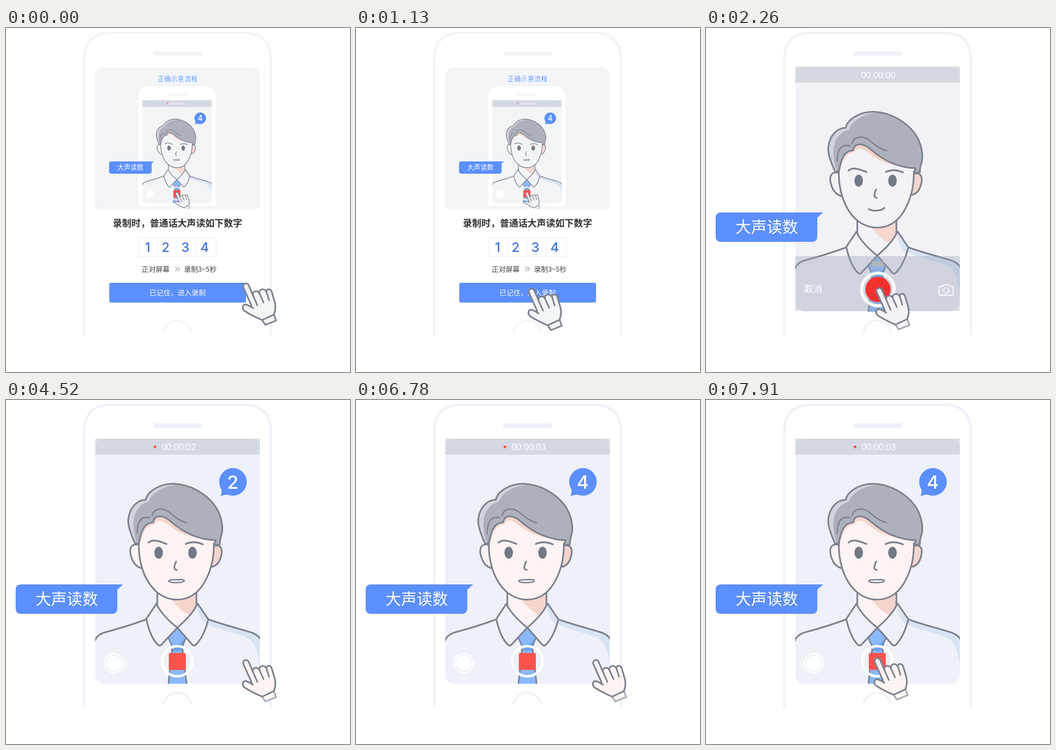
Recreate the animation shown at these times as an HTML page with a canvas. Size 748 by 748 pixels, loop 8 s.

```html
<!DOCTYPE html>
<html lang="zh-CN">
<head>
<meta charset="utf-8">
<title>录制示意</title>
<style>
  html, body { margin: 0; width: 100%; height: 100%; overflow: hidden; background: #fff; }
  canvas { display: block; width: 748px; height: 748px; }
</style>
</head>
<body>
<canvas id="stage" width="748" height="748"></canvas>
<script>
const ctx = document.getElementById('stage').getContext('2d');
const CJK = '"Noto Sans CJK SC", "Noto Sans CJK", sans-serif';
const LATIN = 'Inter, Roboto, sans-serif';
const CLOCK = '"Liberation Sans", Roboto, sans-serif';
const BLUE = '#5c8fff', LINE = '#7c818e', LOOP = 8000, STEP = 1130;

const GUIDE = { bg: '#f2f4f6', skin: '#f2f4f6', blush: '#f8d8d1', phone: '#f3f4f6', cuff: LINE };
const READY = { bg: '#f1f1f6', skin: '#f2f2f7', blush: '#f6d6ce', phone: '#f1f1f7', cuff: '#a2a5b0' };
const LIVE = { bg: '#eef1f8', skin: '#fdf3f2', blush: '#f4d5ce', phone: '#eef1f8', cuff: '#a6a9b4' };

function shape(d, fill, stroke, width = 3.6) {
  const path = new Path2D(d);
  if (fill) { ctx.fillStyle = fill; ctx.fill(path); }
  if (stroke) { ctx.strokeStyle = stroke; ctx.lineWidth = width; ctx.stroke(path); }
}

function box(x, y, w, h, r, fill) {
  ctx.beginPath();
  ctx.roundRect(x, y, w, h, r);
  ctx.fillStyle = fill;
  ctx.fill();
}

function disc(x, y, r, fill) {
  ctx.beginPath();
  ctx.arc(x, y, r, 0, Math.PI * 2);
  ctx.fillStyle = fill;
  ctx.fill();
}

function ring(x, y, r, width, color, from = 0, to = Math.PI * 2) {
  ctx.beginPath();
  ctx.arc(x, y, r, from, to);
  ctx.strokeStyle = color;
  ctx.lineWidth = width;
  ctx.stroke();
}

// y is the visual middle of the line
function label(s, x, y, size, color, { font = CJK, weight = 400, align = 'center', halo } = {}) {
  ctx.font = `${weight} ${size}px ${font}`;
  ctx.textAlign = align;
  const base = y + size * 0.365;
  if (halo) {
    ctx.strokeStyle = halo;
    ctx.lineWidth = 4;
    ctx.strokeText(s, x, base);
  }
  ctx.fillStyle = color;
  ctx.fillText(s, x, base);
}

function clipped(x, y, w, h, r, draw) {
  ctx.save();
  ctx.beginPath();
  ctx.roundRect(x, y, w, h, r);
  ctx.clip();
  draw();
  ctx.restore();
}

function phone(c) {
  shape('M170 666 V70 Q170 11 228 10.5 H518 Q576 11 576 70 V666', '#fff', c.phone, 5);
  box(320, 50.5, 106, 10.5, 4, c.phone);
  ring(372.5, 667, 30.5, 3.5, c.phone, Math.PI * 1.06, Math.PI * 1.94);
}

function hand(dx, dy, fill, cuff) {
  ctx.save();
  ctx.translate(dx, dy);
  shape('M556 644 L564 655.5 L587.5 646 L582 632 Z', fill, cuff, 3.4);
  shape('M534 614 L516 574 C513.5 566 524 562 527.5 569 L537 591 C535 582 546 579 551 587 ' +
    'C549 577 562 575 566.5 584 C565 577 575 575 578 584 L585 608 Q587.5 620 582.5 633 ' +
    'L557 645 C545 640 531 633 520 626 C511 620 515 609 523 611.5 Q530 614 537 619', fill, LINE, 3.5);
  shape('M537 591 L546.5 613 M551 587 L560 607 M566.5 584 L572 602', null, LINE, 3.3);
  ctx.restore();
}

function shirt(c) {
  const flap = 'M417 443 L440 477 C434 500 425 520 413 532 Q409 536 405 532 L372.5 495 C391 479 406 464 414 447 Z';
  shape('M440 477 C470 488 510 498 535 506 Q548 511 552 520 V576 C546 545 545 522 512 512 C486 504 460 498 437 487 Z', '#d8e3f3');
  shape('M329 416 V444 Q344 474 372.5 495 Q402 474 414 444 V418 Z', c.skin);
  shape('M359 433 C382 435 400 428 414 418 V446 Q409 459 398 468 Q376 456 359 433 Z', c.blush);
  shape('M329 416 V447 M414 420 V447', null, LINE);
  shape('M305 477 C270 490 235 500 216 505 Q198 510 193 524', null, LINE);
  shape('M440 477 C470 488 510 498 535 506 Q548 511 553 520', null, LINE);
  shape('M361 543 H384 L393 619 H353 Z', '#8bb9ff', LINE, 3.2);
  shape('M372 495 L352 515 L361 535 Q372 548 384 535 L392 515 Z', '#8bb9ff');
  shape('M390 517 Q382 531 364 535 V544 Q374 549 384 542 L392 515 Z', '#6da2f5');
  shape('M352 515 L361 535 V548 M392 515 L384 535 V548', null, LINE, 3);
  shape('M327 443 L305 476 C310 499 318 520 330 532 Q334 536 338 532 L372.5 495 C352 479 338 464 329 447 Z', c.bg, LINE);
  shape(flap, c.bg);
  shape('M417 443 L440 477 L436 490 Q421 478 415 450 Z', '#d8e3f3');
  shape(flap, null, LINE);
}

function head(c, talking) {
  shape('M289 315 C271 311 267 324 272 340 Q278 362 296 366', c.skin, LINE);
  shape('M452 317 C466 313 472 323 468 338 Q463 361 446 363', c.blush, LINE);
  shape('M289 298 C286 345 298 389 325 415 Q346 434 372 434 C400 434 421 418 435 390 C449 362 452 335 452 300 L400 260 H310 Z', c.skin);
  shape('M291 312 C294 284 303 270 321 267 C323 249 343 250 356 262 C378 283 399 295 425 300 ' +
    'C395 298 371 287 351 270 Q330 255 323 270 C304 274 298 287 294 304 Z', c.blush);
  shape('M289 306 C287 347 298 389 325 415 Q346 434 372 434 C400 434 421 418 435 390 C449 362 452 338 452 312', null, LINE);

  const lower = 'L452 315 L456 305 C422 304 390 292 358 264 C343 250 323 248 320 266 C301 267 294 283 289 311 L281 313';
  const crown = 'C400 183 434 203 453 228 C468 248 473 275 469 292 Q465 302 465 314 ';
  const outer = 'M281 313 C271 291 264 270 266 258 C269 235 284 217 304 217 C307 199 334 182 364 182 ' + crown + lower + ' Z';
  shape(outer, '#d0d4de');
  shape('M285 312 C278 295 273 267 281 247 Q291 225 311 221 C315 205 339 187 372 184 ' + crown + lower + ' Z', '#adb1bc');
  shape(outer, null, LINE);
  shape('M285 290 C286 267 291 251 313 256 M318 251 C321 235 341 233 355 244 C369 256 378 263 393 267', null, LINE, 2.8);

  shape('M310 310 C319 302 331 306 349 313 M391 313 C402 308 415 308 428 314', null, LINE, 3.8);
  for (const x of [332, 405.5]) {
    ctx.beginPath();
    ctx.ellipse(x, 332, 9.3, 13, 0, 0, Math.PI * 2);
    ctx.fillStyle = '#727987';
    ctx.fill();
  }
  shape('M370 351 C365 362 364 369 371.5 369.5', null, LINE);
  if (talking) {
    shape('M354 394 Q355 391 361 391 L381 390.5 Q387.5 390.5 387.5 393 Q386 397 371 397 Q355 397 354 394 Z', '#fff', LINE, 3);
  } else {
    shape('M354 394 C362 399 382 398 388 391', null, LINE);
  }
}

function timeBar(seconds, live) {
  ctx.fillStyle = '#dbdee4';
  ctx.fillRect(194.5, 84, 357.5, 34.5);
  box(194.5, 84, 357.5, 34.5, [20, 20, 0, 0], '#d4d8e0');
  if (live) disc(324, 102, 3, '#fa534d');
  label('00:00:0' + seconds, live ? 375.5 : 374.5, 102, 19.3, '#fff', { font: CLOCK });
}

function speech(halo) {
  const d = 'M33 401 H254.5 L242 412.5 V453 Q242 465 230 465 H33 Q21 465 21 453 V413 Q21 401 33 401 Z';
  if (halo) shape(d, null, '#fff', 9);
  shape(d, BLUE);
  label('大声读数', 132, 432.5, 34, '#fff');
}

function badge(n) {
  disc(493.5, 178, 30, BLUE);
  shape('M467 190 Q471 200 466 209.5 Q475 205 486 206 Z', BLUE);
  label(n, 493, 178, 40, '#fff', { font: LATIN, weight: 500 });
}

function liveScene(c, n, seconds, halo) {
  phone(c);
  clipped(194, 84, 358, 533, [0, 0, 20, 20], () => {
    ctx.fillStyle = c.bg;
    ctx.fillRect(194, 84, 358, 533);
    shirt(c);
    head(c, true);
  });
  timeBar(seconds, true);
  badge(n);
  ring(234.5, 572.5, 20.8, 3, '#fff');
  disc(234.5, 572.5, 16.5, '#fff');
  ring(372.5, 568, 32.8, 5.5, '#fff');
  box(354, 550, 37, 37, 4, '#fc534d');
  speech(halo);
}

function cameraIcon() {
  shape('M509 562 H514 L517 558.5 H528 L531 562 H535 Q537.5 562 537.5 565 V578 Q537.5 581 534.5 581 H509.5 Q506.5 581 506.5 578 V565 Q506.5 562 509 562 Z', null, '#fff', 2);
  ring(522, 571, 6, 1.7, '#fff', Math.PI * 1.1, Math.PI * 1.8);
  ring(522, 571, 6, 1.7, '#fff', Math.PI * 0.1, Math.PI * 0.8);
  shape('M525 570 H531 L528 573.5 Z M513 571.5 H519 L516 568 Z', '#fff');
}

function readyScene() {
  const c = READY;
  phone(c);
  ctx.fillStyle = c.bg;
  ctx.fillRect(194, 84, 358, 531);
  clipped(194, 84, 358, 533, [0, 0, 20, 20], () => {
    shirt(c);
    head(c, false);
  });
  ctx.fillStyle = '#dcdfe5';
  ctx.fillRect(194.5, 594, 20, 21);
  ctx.fillRect(532, 594, 20, 21);
  clipped(194.5, 496, 357.5, 120, [0, 0, 20, 20], () => {
    ctx.fillStyle = c.bg;
    ctx.fillRect(194, 590, 24, 28);
    ctx.fillRect(528, 590, 24, 28);
    ctx.fillStyle = 'rgba(147,158,180,.35)';
    ctx.fillRect(194, 496, 358, 120);
  });
  timeBar(0, false);
  label('视频', 373, 513, 14, '#d8c27a');
  label('取消', 233, 568, 20, '#fff');
  cameraIcon();
  ring(374, 568.5, 35.5, 6.5, '#fff');
  disc(374, 568.5, 27.5, '#f53130');
  speech();
  hand(-145, 0, c.skin, c.cuff);
}

function guideScene(dx, dy) {
  phone(GUIDE);
  box(194, 86, 357.5, 307, [18, 18, 0, 0], GUIDE.bg);
  label('正确示意流程', 373, 111, 14.5, BLUE, { halo: '#fff' });

  // the recording screen, shrunk into the card
  const k = 0.42;
  clipped(194, 86, 357.5, 307, 0, () => {
    ctx.translate(215.1, 121.6);
    ctx.scale(k, k);
    clipped(0, 0, 748, 632, 0, () => liveScene(GUIDE, 4, 3, true));
    hand(-149, -4, GUIDE.skin, '#a6a9b4');
  });

  label('录制时，普通话大声读如下数字', 373, 425, 20.1, '#333', { weight: 600 });
  ctx.strokeStyle = '#eceef2';
  ctx.lineWidth = 1.3;
  ctx.strokeRect(289, 456, 168, 41);
  for (const x of [330, 371.5, 414]) shape(`M${x} 456 V497`, null, '#eceef2', 1.3);
  [308, 347, 390, 432].forEach((x, i) =>
    label(i + 1, x, 477, 28.5, '#4272dd', { font: LATIN, weight: 500 }));
  label('正对屏幕', 295, 524, 15.2, '#444', { align: 'left' });
  shape('M368.5 519.5 L372 524 L368.5 528.5 M373.5 519.5 L377 524 L373.5 528.5', null, '#777', 1.2);
  label('录制3~5秒', 387, 524, 15.2, '#444', { align: 'left' });
  box(224.5, 554, 297.5, 43, 4, BLUE);
  label('已记住，进入录制', 373, 575.5, 15.3, '#fff');
  hand(dx, dy, GUIDE.skin, GUIDE.cuff);
}

function draw(t) {
  ctx.fillStyle = '#fff';
  ctx.fillRect(0, 0, 748, 748);
  ctx.lineCap = ctx.lineJoin = 'round';
  const step = Math.floor(t / STEP);
  if (step === 0) return guideScene(0, -10);
  if (step === 1) return guideScene(-140, 1.5);
  if (step === 2) return readyScene();
  const n = Math.min(step - 2, 4);
  liveScene(LIVE, n, Math.min(n, 3));
  if (step < 7) hand(0, 0, LIVE.skin, LIVE.cuff);
  else hand(-149, -4, LIVE.skin, LIVE.cuff);
}

const start = performance.now();
function tick() {
  draw((performance.now() - start) % LOOP);
  requestAnimationFrame(tick);
}
tick();
</script>
</body>
</html>
```
